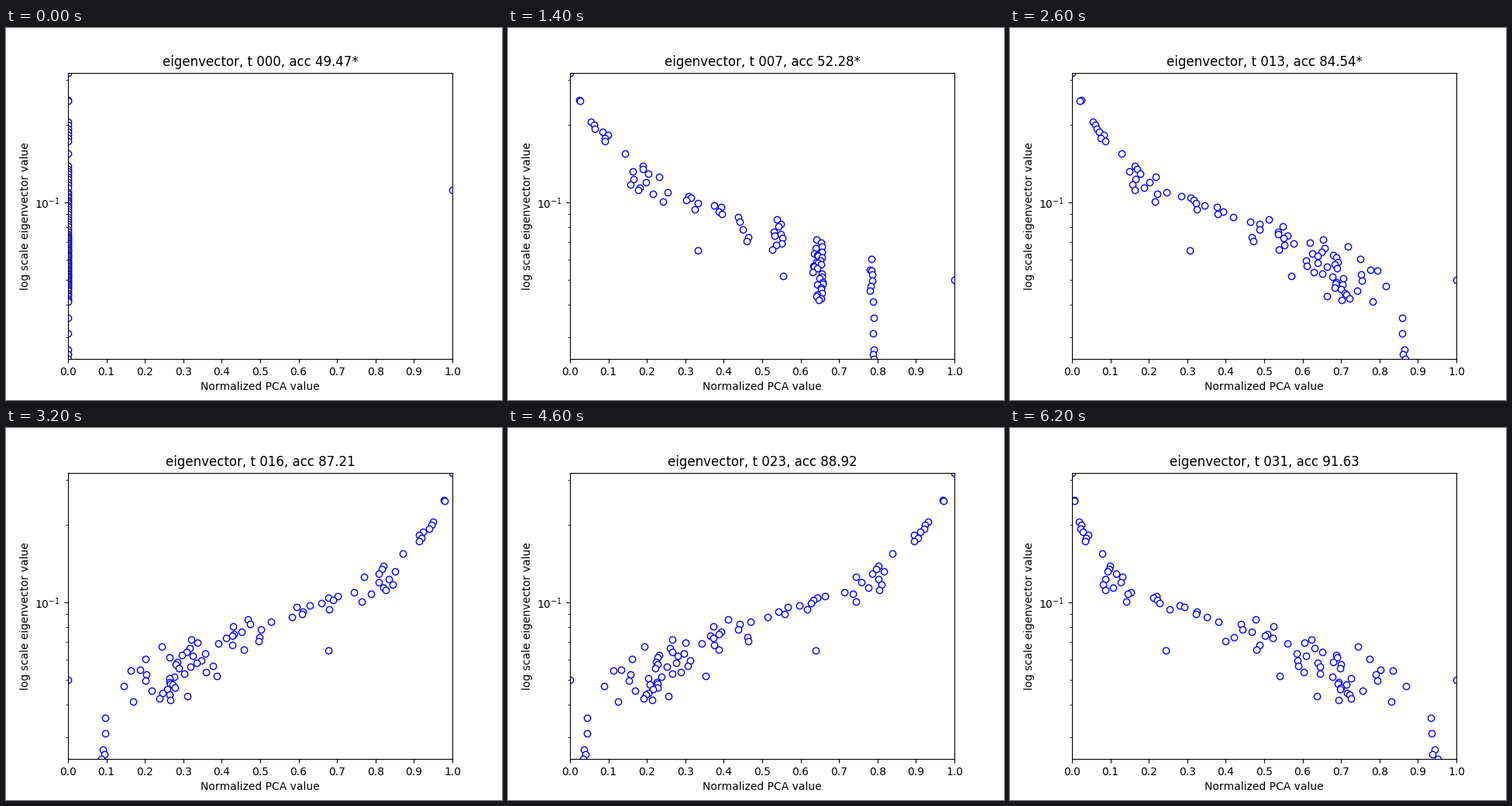
These frames come from a looping animation (640 by 480 pixels, 6400 ms). A matplotlib script:

```python
import numpy as np
import matplotlib.pyplot as plt
from matplotlib.animation import FuncAnimation
from matplotlib.ticker import LogLocator, NullFormatter

STEPS, POINTS = 32, 94
LOG_TOP, LOG_BOTTOM = -0.4958, -1.609
FLIP_START, FLIP_END = 16, 30  # the sign of the component is reversed here
plt.rcParams["text.kerning_factor"] = 6

rng = np.random.default_rng(7)
index = np.arange(POINTS)

# Depth runs from 0 at the largest value to 1 at the smallest.
depth = np.interp(index,
                  [0, 1, 2, 3, 9, 11, 20, 30, 40, 60, 80, 88, 91, 93],
                  [0, .096, .098, .172, .24, .326, .41, .477, .564, .66,
                   .75, .80, .967, 1])
values = 10 ** (LOG_TOP + depth * (LOG_BOTTOM - LOG_TOP))

# Rank is the settled place along the component; its scatter grows with depth.
depth_keys = [0, .1, .24, .41, .52, .6, .69, .80, .84, 1]
rank = np.interp(depth, depth_keys,
                 [0, .03, .11, .28, .56, .66, .80, .81, .95, .96])
scatter = np.interp(depth, depth_keys,
                    [0, .003, .01, .045, .05, .07, .075, .06, .005, .005])
rank = np.clip(rank + scatter * rng.normal(size=POINTS), 0, .97)
rank[[52, 74]] = .37, 1  # two stray points

phase = rng.uniform(0, 2 * np.pi, POINTS)
first = (index == 20).astype(float)  # the only point apart at the start
bands = np.array([.45, .54, .645, .785])
key_steps = [0, 7, 13, 19, 23, 27, 31]


def keyed(step, *levels):
    return np.interp(step, key_steps, levels)


def positions(step):
    """Normalized component value of every point at a time step."""
    x = keyed(step, .88, .88, .9, 1, 1, 1, 1) * rank ** keyed(
        step, 1, 1, 1.05, 1.1, 1, 1, 1.45)
    nearest = bands[np.abs(x[:, None] - bands).argmin(axis=1)]
    pull = keyed(step, .9, .9, 0, 0, 0, 0, 0)
    x += np.where(x > .4, pull * (nearest - x), 0)
    x += .05 * rank * (1 - rank) * np.sin(.6 * step + phase)
    x[rank == 1] = 1
    grow = min(step / 7, 1)
    x = (1 - grow) * first + grow * x
    x = (x - x.min()) / (x.max() - x.min())
    return 1 - x if FLIP_START <= step < FLIP_END else x


fig, ax = plt.subplots(figsize=(6.4, 4.8), dpi=100)
fig.subplots_adjust(left=.125, right=.9, bottom=.11, top=.88)
ax.set_yscale("log")
ax.set_xlim(0, 1)
ax.set_ylim(10 ** LOG_BOTTOM, 10 ** LOG_TOP)
ax.set_xticks(np.arange(11) / 10)
ax.yaxis.set_minor_locator(LogLocator(subs=range(2, 10)))
ax.yaxis.set_minor_formatter(NullFormatter())
ax.set_xlabel("Normalized PCA value")
ax.set_ylabel("log scale eigenvector value")
title = ax.set_title("")
dots, = ax.plot([], [], "o", color="blue", markerfacecolor="white",
                markersize=6, markeredgewidth=1)


def update(step):
    accuracy = keyed(step, 49.47, 52.28, 84.54, 89.88, 88.92, 90.77, 91.63)
    star = "*" if step < FLIP_START else ""
    title.set_text(f"eigenvector, t {step:03d}, acc {accuracy:.2f}{star}")
    dots.set_data(positions(step), values)
    return dots, title


animation = FuncAnimation(fig, update, frames=STEPS, interval=200, repeat=True)
plt.show()
```
